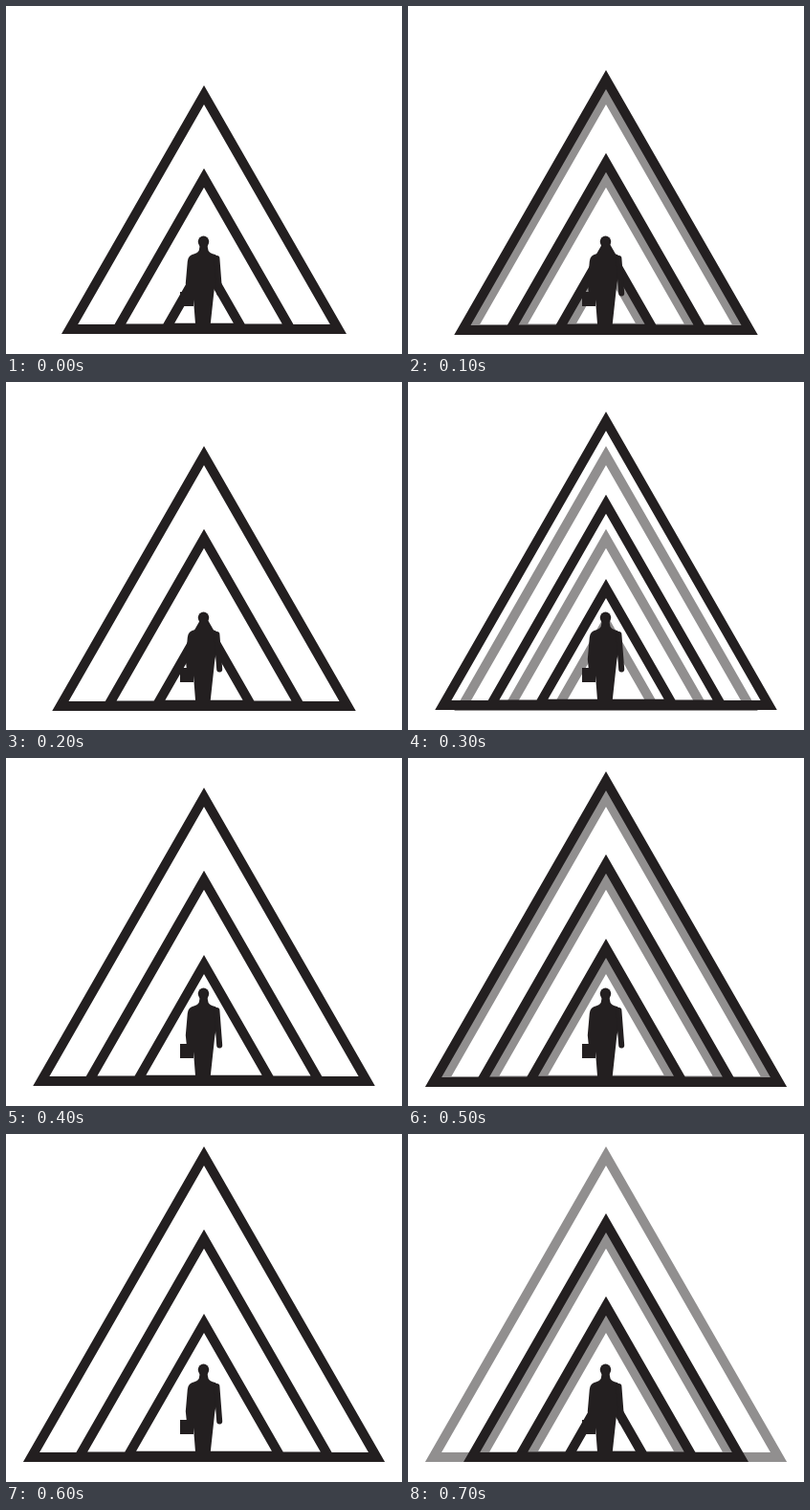
Write an HTML page that moves like this. It is 414 by 364 pixels and loops after 800 ms.

```html
<!DOCTYPE html>
<html lang="en">
<head>
<meta charset="utf-8">
<title>Walking into triangles</title>
<style>
  html, body { margin: 0; width: 100%; height: 100%; overflow: hidden; background: #fff; }
  svg { display: block; width: 414px; height: 364px; fill: #231f20; }
  line { stroke: #231f20; stroke-width: 6px; stroke-linecap: round; }
</style>
</head>
<body>
<svg viewBox="0 0 414 364">
  <g id="poses"></g>
  <g id="man">
    <ellipse cx="206.5" cy="246.6" rx="5.7" ry="6"/>
    <path d="M202 248Q204 257.5 197 259.3Q190.5 260.5 189.8 267L187.8 290L189 302H195.6L198.2 335
      H213.5L218.3 291L223 266Q222 260.5 216 259.3Q209.5 257.5 211 248Z"/>
    <line x1="220.4" y1="264" x2="223.2" y2="300.5"/>
    <rect x="182" y="299" width="14" height="15"/>
  </g>
</svg>
<script>
const STEP = 100, LOOP = 8 * STEP;
const CX = 207, SLOPE = 0.573, BAR = 10, INSET = 20, RISE = 0.6;
const GAPS = [0, 86.8, 175];

// top: outer apex, base: ground line, enter: offset during the first step
const poses = [
  { top: 83, base: 343, enter: 0 },
  { top: 67, base: 344, enter: 0 },
  { top: 31, base: 343, enter: 0 },
  { top: 13, base: 343, enter: 1 }
];

const tri = (top, base) => {
  const w = (base - top) * SLOPE;
  return `M${CX} ${top}L${CX + w} ${base}H${CX - w}Z`;
};

// nested outlines for an even-odd fill; each one stands on the floor of the one around it
const outline = ({ top, base }) => {
  let ground = base;
  return GAPS.map((gap, i) => {
    const y = top + gap, floor = base - BAR - i * RISE;
    const ring = tri(y, ground) + tri(y + INSET, floor);
    ground = floor;
    return ring;
  }).join('');
};

const layer = document.getElementById('poses');

// each pose is solid for two steps, then a ghost for one
poses.forEach((pose, i) => {
  const path = document.createElementNS('http://www.w3.org/2000/svg', 'path');
  path.setAttribute('d', outline(pose));
  path.setAttribute('fill-rule', 'evenodd');
  layer.append(path);

  const key = (step, opacity, dy = 0) => ({
    offset: step * STEP / LOOP,
    opacity,
    transform: `translateY(${dy}px)`,
    easing: 'steps(1, end)'
  });
  path.animate(
    [key(0, 1, pose.enter), key(1, 1), key(2, 0.5), key(3, 0), key(8, 0)],
    { duration: LOOP, delay: (2 * i - 1) * STEP - LOOP, iterations: Infinity }
  );
});
</script>
</body>
</html>
```
